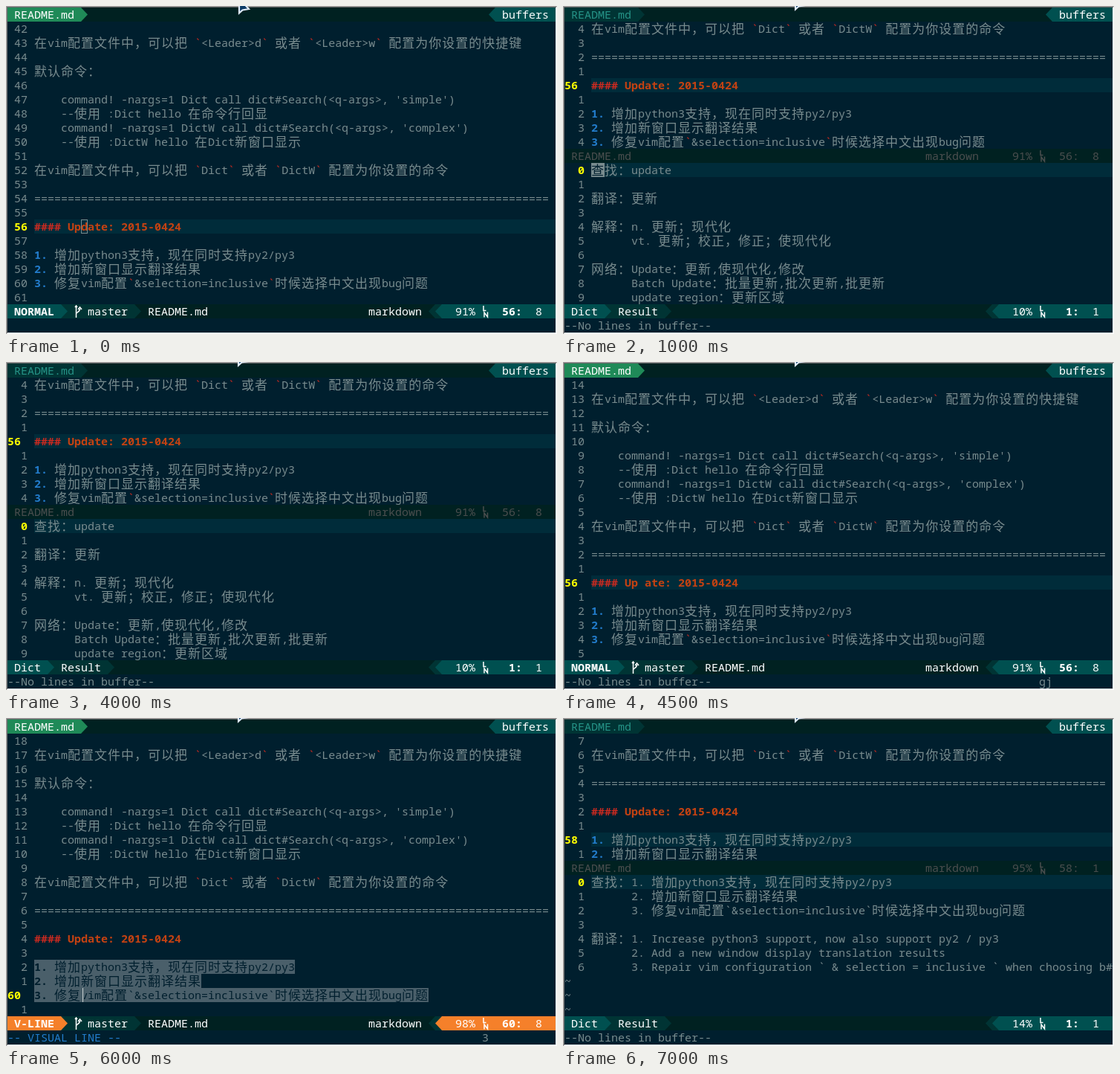
Recreate the animation shown at these times as an HTML page. Size 742 by 441 pixels, loop 8 s.

```html
<!DOCTYPE html>
<html lang="zh-CN">
<head>
<meta charset="utf-8">
<title>Vim dictionary</title>
<style>
:root {
  --bg: #001f2e; --line: #002c3a; --text: #788b8e; --red: #cc2a20; --orange: #c44212; --blue: #227ccb;
  --n1: #005050; --n2: #003434; --n3: #002121; --tab: #1f8a58; --visual: #f5802a; --sel: #4a5f6a;
}
html, body { margin: 0; width: 100%; height: 100%; overflow: hidden; background: var(--bg); }
#stage { position: relative; width: 742px; height: 441px; overflow: hidden; }
#strip { animation: show 8s step-end infinite; }
.scene {
  position: relative; width: 742px; height: 441px; overflow: hidden;
  background: var(--bg); color: var(--text);
  font: 15px/19px "Noto Sans Mono", "DejaVu Sans Mono", monospace;
  font-variant-ligatures: none;
}
p, u { position: absolute; margin: 0; height: 19px; white-space: pre; text-decoration: none; }
i {
  font: 300 17px/0 "Noto Sans CJK SC", "Noto Sans CJK", sans-serif; letter-spacing: 1px;
  position: relative; top: 1px;
}
svg { position: absolute; overflow: visible; fill: none; stroke: currentColor; }
.red { color: var(--red); }
.orange { color: var(--orange); }
.blue { color: var(--blue); }
.now { color: #ff0; font-weight: 700; }
.white { color: #fff; }
.dim { color: #4a4e4e; }
.dim b { font-weight: 400; }
.teal { color: #259286; }
.sel { background: var(--sel); color: var(--bg); }
.sel * { color: inherit; }
.cur { background: var(--text); color: var(--bg); }
.hollow { box-shadow: inset 0 0 0 1px var(--text); }
.blank { background: var(--line); }
.half { background: linear-gradient(90deg, var(--sel) 2px, #c8d0d0 2px 3px, var(--sel) 3px); width: 4px; overflow: hidden; }
#edge {
  position: absolute; inset: 0;
  box-shadow: inset 1px 1px #a0a0a0, inset -1px -1px #fff, inset 2px 2px #696969, inset -2px -2px #e3e3e3;
}
#mouse { left: 0; top: 0; animation: nudge 8s step-end infinite; }
@keyframes nudge { 0% { transform: none; } 6.25%, 100% { transform: translate(-1px, -5px); } }
@keyframes show {
  0% { transform: none; }
  6.25% { transform: translateY(-441px); }
  12.5% { transform: translateY(-882px); }
  31.25% { transform: translateY(-1323px); }
  37.5% { transform: translateY(-882px); }
  50% { transform: translateY(-1323px); }
  56.25% { transform: translateY(-1764px); }
  62.5% { transform: translateY(-2205px); }
  68.75% { transform: translateY(-2646px); }
  75% { transform: translateY(-3087px); }
  81.25% { transform: translateY(-3528px); }
  87.5%, 100% { transform: translateY(-3969px); }
}
</style>
</head>
<body>
<div id="stage">
  <div id="strip"></div>
  <div id="edge"></div>
  <svg id="mouse" width="742" height="20"><path d="M314-8V9.5L318.5 5.5L327 4L316-8Z" fill="#0b3a66" stroke="#dfeaf8" stroke-width="2.2"/></svg>
</div>
<script>
const FIRST = 42, COLS = 82;
const README = [
  '',
  '在vim配置文件中，可以把 `<Leader>d` 或者 `<Leader>w` 配置为你设置的快捷键',
  '',
  '默认命令：',
  '',
  "    command! -nargs=1 Dict call dict#Search(<q-args>, 'simple')",
  '    --使用 :Dict hello 在命令行回显',
  "    command! -nargs=1 DictW call dict#Search(<q-args>, 'complex')",
  '    --使用 :DictW hello 在Dict新窗口显示',
  '',
  '在vim配置文件中，可以把 `Dict` 或者 `DictW` 配置为你设置的命令',
  '',
  '='.repeat(77),
  '',
  '#### Update: 2015-0424',
  '',
  '1. 增加python3支持，现在同时支持py2/py3',
  '2. 增加新窗口显示翻译结果',
  '3. 修复vim配置`&selection=inclusive`时候选择中文出现bug问题',
  ''
];
const WORD = [
  '查找：update',
  '',
  '翻译：更新',
  '',
  '解释：n. 更新；现代化',
  '      vt. 更新；校正，修正；使现代化',
  '',
  '网络：Update：更新,使现代化,修改',
  '      Batch Update：批量更新,批次更新,批更新',
  '      update region：更新区域'
];
const LINES = [
  '查找：1. 增加python3支持，现在同时支持py2/py3',
  '      2. 增加新窗口显示翻译结果',
  '      3. 修复vim配置`&selection=inclusive`时候选择中文出现bug问题',
  '',
  '翻译：1. Increase python3 support, now also support py2 / py3',
  '      2. Add a new window display translation results',
  '      3. Repair vim configuration ` & selection = inclusive ` when choosing b#'
];
const EMPTY = '--No lines in buffer--';

const pos = (col, row) => `left:${2 + col * 9}px;top:${2 + row * 19}px`;
const html = s => s.replace(/&/g, '&amp;').replace(/</g, '&lt;')
  .replace(/[\u3000-\u9fff\uff00-\uffef]+/g, '<i>$&</i>');
const raw = (col, row, s, cls = '') => `<p class="${cls}" style="${pos(col, row)}">${s}</p>`;
const put = (col, row, s, cls) => raw(col, row, html(s), cls);
const bar = (col, n, row, color) =>
  `<u style="${pos(col, row)};width:${n * 9}px;background:var(--${color})"></u>`;
const arrow = (col, row, color, left) =>
  `<u style="${pos(col, row)};width:9px;background:var(--${color});` +
  `clip-path:polygon(${left ? '100% 0,0 50%,100% 100%' : '0 0,100% 50%,0 100%'})"></u>`;
const icon = (col, row, d, cls) =>
  `<svg class="${cls}" style="${pos(col, row)}" width="9" height="19" stroke-width="1.5"><path d="${d}"/></svg>`;
const branch = (col, row) =>
  icon(col, row, 'M2.5 2V18M2.5 13C2.5 10 7.5 11 7.5 6M5 7L7.5 4L10 7M1 4L2.5 2L4 4', 'white');

const markup = s => html(s)
  .replace(/`/g, '<span class="red">`</span>')
  .replace(/^(#+) (.*)/, '<b class="red">$1</b> <b class="orange">$2</b>')
  .replace(/^\d\./, '<b class="blue">$&</b>');

// Rows of the document window; sel is the number of selected lines above and including cur
function doc(from, count, cur, { abs, sel = 0 } = {}) {
  let out = '';
  for (let k = 0; k < count; k++) {
    const n = from + k, row = k + 1, here = n === cur;
    const label = abs ? `${n}`.padStart(3) : here ? `${n}` : `${Math.abs(n - cur)}`.padStart(3);
    if (here && !sel) out += bar(4, COLS - 4, row, 'line');
    out += put(0, row, label, here ? 'now' : '');
    out += raw(4, row, markup(README[n - FIRST]), n <= cur && n > cur - sel ? 'sel' : '');
  }
  return out;
}

const position = (row, pct, line, col, cls) =>
  put(67, row, pct + '%', cls) +
  icon(71, row, 'M2 2V8.5H5.5M3 17.5V11L7.5 17V10.5', cls) +
  raw(72, row, `<b>${`${line}`.padStart(4)}:</b>`, cls) + put(79, row, `${col}`, cls);

function status(name, nameEnd, next, nextEnd, color, pct, line, col) {
  return bar(0, COLS, 21, 'n3') +
    bar(nameEnd, nextEnd - nameEnd, 21, 'n2') + arrow(nextEnd, 21, 'n2') +
    bar(0, nameEnd, 21, color) + arrow(nameEnd, 21, color) +
    name + next +
    arrow(63, 21, 'n2', true) + bar(64, 1, 21, 'n2') +
    arrow(64, 21, color, true) + bar(65, COLS - 65, 21, color) +
    position(21, pct, line, col, 'white');
}

const tabline = on => bar(0, COLS, 0, 'n3') +
  bar(0, 11, 0, on ? 'tab' : 'n2') + arrow(11, 0, on ? 'tab' : 'n2') +
  put(1, 0, 'README.md', on ? 'white' : 'teal') +
  arrow(72, 0, 'n1', true) + bar(73, 9, 0, 'n1') + put(74, 0, 'buffers', 'white');

function editor(cur, pct, { abs, sel, msg = '', keys = '', cursor = '' } = {}) {
  const mode = `<b>${sel ? 'V-LINE' : 'NORMAL'}</b>`;
  return tabline(true) + doc(FIRST, 20, cur, { abs, sel }) + cursor +
    status(raw(1, 21, mode, 'white'), 8, branch(10, 21) + put(12, 21, 'master', 'white'), 19,
      sel ? 'visual' : 'n1', pct, cur, 8) +
    put(21, 21, 'README.md', 'white') + put(54, 21, 'markdown', 'white') +
    put(0, 22, msg, sel ? 'blue' : '') + put(71, 22, keys);
}

function result(lines, from, cur, col, docPct, pct, cursor) {
  let out = tabline(false) + doc(from, 9, cur) +
    bar(0, COLS, 10, 'n3') + put(1, 10, 'README.md', 'dim') + put(54, 10, 'markdown', 'dim') +
    position(10, docPct, cur, col, 'dim') + bar(4, COLS - 4, 11, 'line');
  for (let k = 0; k < 10; k++) {
    const s = lines[k];
    if (s === undefined) out += put(0, 11 + k, '~');
    else out += put(0, 11 + k, `${k}`.padStart(3), k ? '' : 'now') + put(4, 11 + k, s);
  }
  return out + (cursor ? put(4, 11, '查', 'cur') : '') +
    status(put(1, 21, 'Dict', 'white'), 6, put(8, 21, 'Result', 'white'), 15, 'n1', pct, 1, 1) +
    put(0, 22, EMPTY);
}

const word = on => result(WORD, 52, 56, 8, 91, 10, on);
const lines = on => result(LINES, 51, 58, 1, 95, 14, on);
const visual = '-- VISUAL LINE --';
const scenes = [
  editor(56, 91, { abs: true, cursor: put(11, 15, ' ', 'hollow') }),
  editor(56, 91, { cursor: put(11, 15, 'd', 'cur') }),
  word(true),
  word(false),
  editor(56, 91, { msg: EMPTY, keys: 'gj', cursor: put(11, 15, ' ', 'blank') }),
  editor(58, 95, { msg: EMPTY, cursor: put(11, 17, 'p', 'cur') }),
  editor(59, 96, { sel: 2, msg: visual, keys: 'gj' }),
  editor(60, 98, { sel: 3, msg: visual, keys: '3', cursor: put(11, 19, ' ', 'half') }),
  lines(true),
  lines(false)
];
document.getElementById('strip').innerHTML = scenes.map(s => `<div class="scene">${s}</div>`).join('');
</script>
</body>
</html>
```
